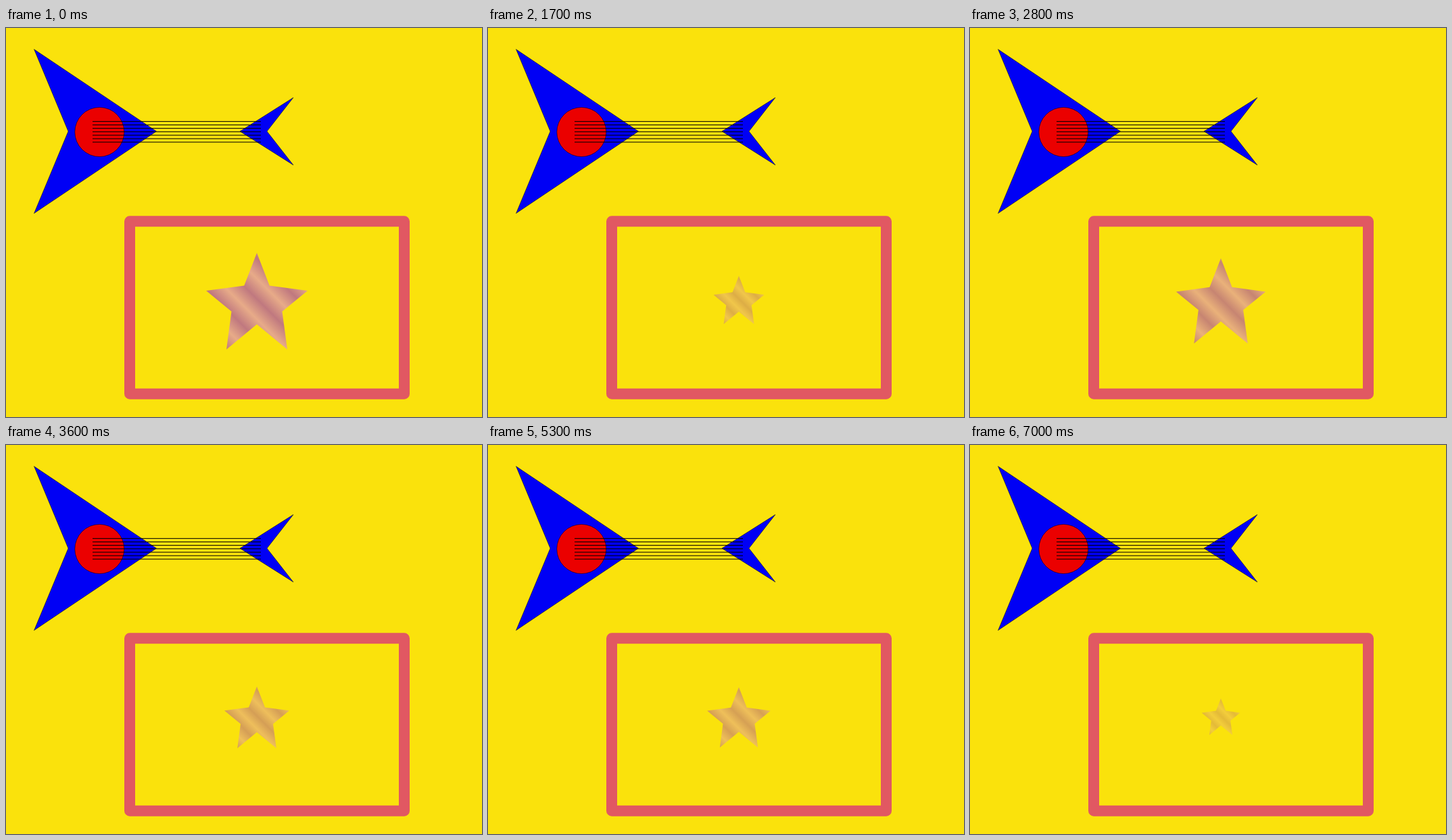
Write an HTML page that moves like this. It is 704 px wide and 576 px high and loops after 7.1 s.

```html
<!DOCTYPE html>
<html lang="en">
<head>
<meta charset="utf-8">
<title>Guitar and star</title>
<style>
  html, body { margin: 0; width: 100%; height: 100%; overflow: hidden; background: #fae20c; }
  #stage { position: absolute; left: 0; top: 0; width: 704px; height: 576px; overflow: hidden; }
  svg { display: block; }
  #star {
    position: absolute; left: 246px; top: 275.8px; width: 250px; height: 250px;
    background: repeating-linear-gradient(45deg, #db86db, darkorchid 10%, #db86db 20%);
    clip-path: polygon(50% 4.7%, 62.5% 37%, 100% 42%, 75% 62.5%, 80% 100%,
      50% 75.2%, 20% 100%, 25% 62.5%, 0 42%, 37.5% 37%);
  }
</style>
</head>
<body>
<div id="stage">
  <svg width="704" height="576" viewBox="0 0 704 576">
    <g fill="#0000f5" stroke="#000" stroke-width=".5">
      <path d="M41.5 31.5 222.5 153 41.5 274.5 92 153Z"/>
      <path d="M346 153 425 103 386 153 425 203Z"/>
      <circle cx="138.3" cy="154" r="36.5" fill="#eb0000"/>
    </g>
    <g id="strings" stroke="#000"></g>
    <rect x="183" y="286.3" width="406" height="255.4" fill="none"
      stroke="#e15862" stroke-width="16" stroke-linejoin="round"/>
  </svg>
  <div id="star"></div>
</div>
<script>
  const LOOP = 7100, STEP = 100;
  const star = document.getElementById('star');

  document.getElementById('strings').innerHTML = Array.from({ length: 7 }, (_, i) => {
    const y = 138.4 + i * 5.1;
    return `<line x1="128" x2="377" y1="${y}" y2="${y}"/>`;
  }).join('');

  // The picture rests twice near the start, then steps evenly.
  function stepTime(t) {
    if (t < 200) return 0;
    if (t < 900) return 200;
    return Math.floor(t / STEP) * STEP;
  }

  function smoothstep(from, to, t) {
    const x = Math.min(1, Math.max(0, (t - from) / (to - from)));
    return x * x * (3 - 2 * x);
  }

  // One turn is a growth and a shrink; it lasts 2 s, a little less mid-loop.
  function pulse(t) {
    const phase = t / 2000 - 0.7 + 0.314 * smoothstep(1700, 7000, t);
    const turn = phase - Math.floor(phase);
    return 2 * Math.min(turn, 1 - turn);
  }

  function draw(t) {
    const size = pulse(stepTime(t));
    star.style.transform = `scale(${size})`;
    star.style.opacity = size;
  }

  const start = performance.now();
  function tick() {
    draw((performance.now() - start) % LOOP);
    requestAnimationFrame(tick);
  }
  tick();
</script>
</body>
</html>
```
